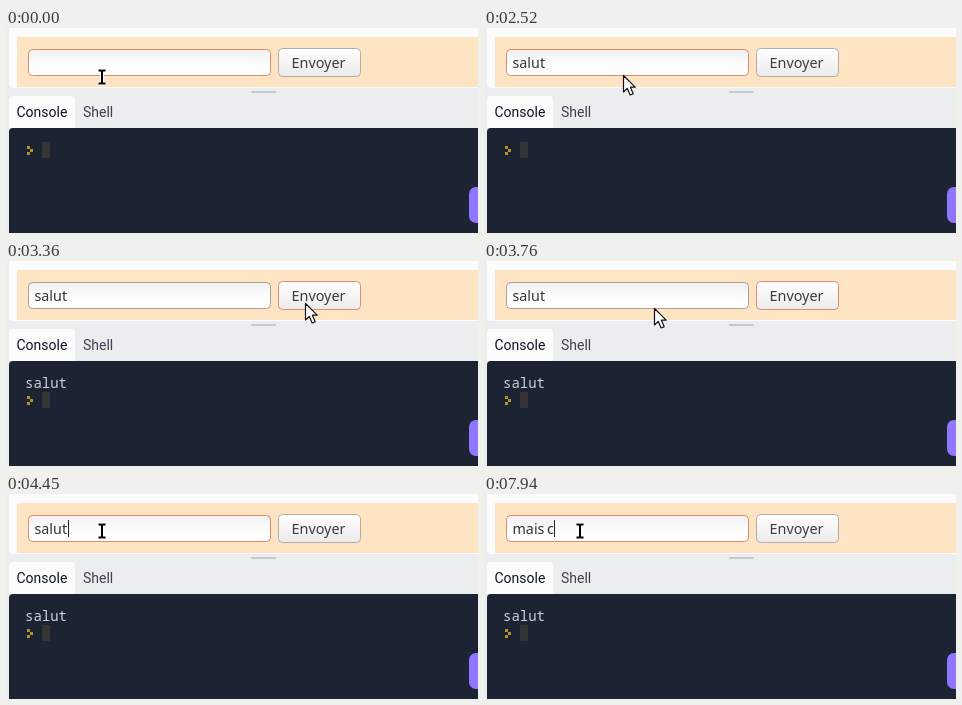
An HTML page for the animation above (8 s loop, 472 by 205 pixels).

```html
<!DOCTYPE html>
<html lang="fr">
<head>
<meta charset="utf-8">
<title>Console</title>
<style>
  html, body { margin: 0; width: 100%; height: 100%; overflow: hidden; background: #ebedee; }
  svg { display: block; width: 472px; height: 205px; }
  text { white-space: pre; }
  .ui { font: 14.4px "Noto Sans", "Open Sans", sans-serif; fill: #3c3c3c; }
  #typed { font-size: 14.3px; word-spacing: -1.2px; fill: #333; }
  .tab { font: 14px Roboto, sans-serif; }
  .mono { font: 14px "Noto Sans Mono", "DejaVu Sans Mono", monospace; fill: #cdd1d6; }
  #field { stroke: #aaa198; }
  #field.focus, #button.focus { stroke: #d98d6c; }
  #button { stroke: #b5ada4; }
  #button.hover { stroke: #98979c; }
</style>
</head>
<body>
<svg viewBox="0 0 472 205">
  <defs>
    <linearGradient id="fieldFill" x2="0" y2="1">
      <stop offset="0" stop-color="#f1f1f1"/>
      <stop offset=".6" stop-color="#fdfdfd"/>
      <stop offset="1" stop-color="#fff"/>
    </linearGradient>
    <linearGradient id="buttonFill" x2="0" y2="1">
      <stop offset="0" stop-color="#fff"/>
      <stop offset="1" stop-color="#ebebeb"/>
    </linearGradient>
  </defs>

  <!-- page preview -->
  <path d="M3 0H472V60H7a4 4 0 0 1-4-4Z" fill="#fcfcfc"/>
  <path d="M11 9H472V59H11Z" fill="#ffe4c4"/>
  <rect id="field" x="22.5" y="21.5" width="242" height="26" rx="4" fill="url(#fieldFill)"/>
  <rect id="button" x="272.5" y="20.5" width="82" height="28" rx="4" fill="url(#buttonFill)"/>
  <text id="typed" class="ui" x="28.5" y="40"></text>
  <rect id="caret" y="26" width="1" height="17" fill="#222"/>
  <text class="ui" x="285.5" y="40">Envoyer</text>
  <rect x="245" y="63" width="25" height="2" rx="1" fill="#c5c9cd"/>

  <!-- tabs and terminal -->
  <path d="M3 100V72a4 4 0 0 1 4-4H65a4 4 0 0 1 4 4V100Z" fill="#fcfcfc"/>
  <text class="tab" x="10.5" y="89" fill="#0e1525">Console</text>
  <text class="tab" x="77" y="89" fill="#3c4350">Shell</text>
  <path d="M3 205V104a4 4 0 0 1 4-4H472V205Z" fill="#1c2333"/>
  <text id="output" class="mono" x="19" y="127">salut</text>
  <g id="prompt">
    <path d="M21 118h3v3h-3zM24 121h3v3h-3zM21 124h3v3h-3z" fill="#ad951f"/>
    <rect x="36" y="114" width="8" height="16" fill="#353535"/>
  </g>
  <rect x="463" y="159" width="30" height="36" rx="7" fill="#9177ff"/>

  <!-- mouse cursors, hotspot at 0,0 -->
  <path id="arrow" d="M.5 .5V17L4.3 13.4L7.2 20L10.2 18.7L7.4 12.2H12.2Z" fill="#fff" stroke="#111" stroke-width="1.2" stroke-linejoin="round"/>
  <g id="beam" fill="none">
    <path d="M-3.5-6.5H-1L0-5.5L1-6.5H3.5M0-5.5V5.5M-3.5 6.5H-1L0 5.5L1 6.5H3.5" stroke="#fff" stroke-width="4"/>
    <path d="M-3.5-6.5H-1L0-5.5L1-6.5H3.5M0-5.5V5.5M-3.5 6.5H-1L0 5.5L1 6.5H3.5" stroke="#000" stroke-width="2"/>
  </g>
</svg>
<script>
const LOOP = 8000;
const $ = id => document.getElementById(id);
const [field, button, typed, caret, output, prompt, arrow, beam] =
  ['field', 'button', 'typed', 'caret', 'output', 'prompt', 'arrow', 'beam'].map($);

const typing = [
  [0, ''], [1030, 's'], [1180, 'sa'], [1360, 'sal'], [1470, 'salu'], [1580, 'salut'],
  [5180, 'salu'], [5360, 'sal'], [5550, 'sa'], [5730, 's'], [5880, ''],
  [6640, 'm'], [6820, 'ma'], [6970, 'mai'], [7270, 'mais'], [7580, 'mais '], [7880, 'mais c']
];
const trackX = [[2360, 96], [2910, 306], [3270, 306], [4060, 106], [4120, 106], [4270, 96]];
const trackY = [[2360, 49], [2910, 41], [3270, 41], [3760, 47], [4060, 41], [4120, 41], [4270, 37]];

const between = (t, a, b) => t >= a && t < b;
const show = (el, on) => el.setAttribute('visibility', on ? 'visible' : 'hidden');
const move = (el, x, y) => el.setAttribute('transform', `translate(${x} ${y})`);

// Smoothstep between neighbouring [time, value] points
function sample(track, t) {
  const i = track.findIndex(p => p[0] > t);
  if (i === 0) return track[0][1];
  if (i < 0) return track[track.length - 1][1];
  const [t0, a] = track[i - 1], [t1, b] = track[i];
  const p = (t - t0) / (t1 - t0);
  return a + (b - a) * p * p * (3 - 2 * p);
}

function render(t) {
  const text = typing.filter(k => k[0] <= t).pop()[1];
  if (typed.textContent !== text) typed.textContent = text;
  const width = text ? typed.getComputedTextLength() : 0;
  caret.setAttribute('x', Math.round(29 + width));
  show(caret, between(t, 210, 2400) || t >= 4240);

  const x = Math.round(sample(trackX, t)), y = Math.round(sample(trackY, t));
  const pointing = between(t, 2390, 3850);
  show(arrow, pointing);
  show(beam, !pointing);
  move(arrow, x, y);
  move(beam, x, y);

  const onButton = between(t, 3060, 4240);
  field.classList.toggle('focus', !onButton);
  button.classList.toggle('focus', onButton);
  button.classList.toggle('hover', !onButton && x >= 272);

  const sent = t >= 3270;
  show(output, sent);
  move(prompt, 0, sent ? 17 : 0);
}

function tick() {
  render(performance.now() % LOOP);
  requestAnimationFrame(tick);
}
tick();
</script>
</body>
</html>
```
